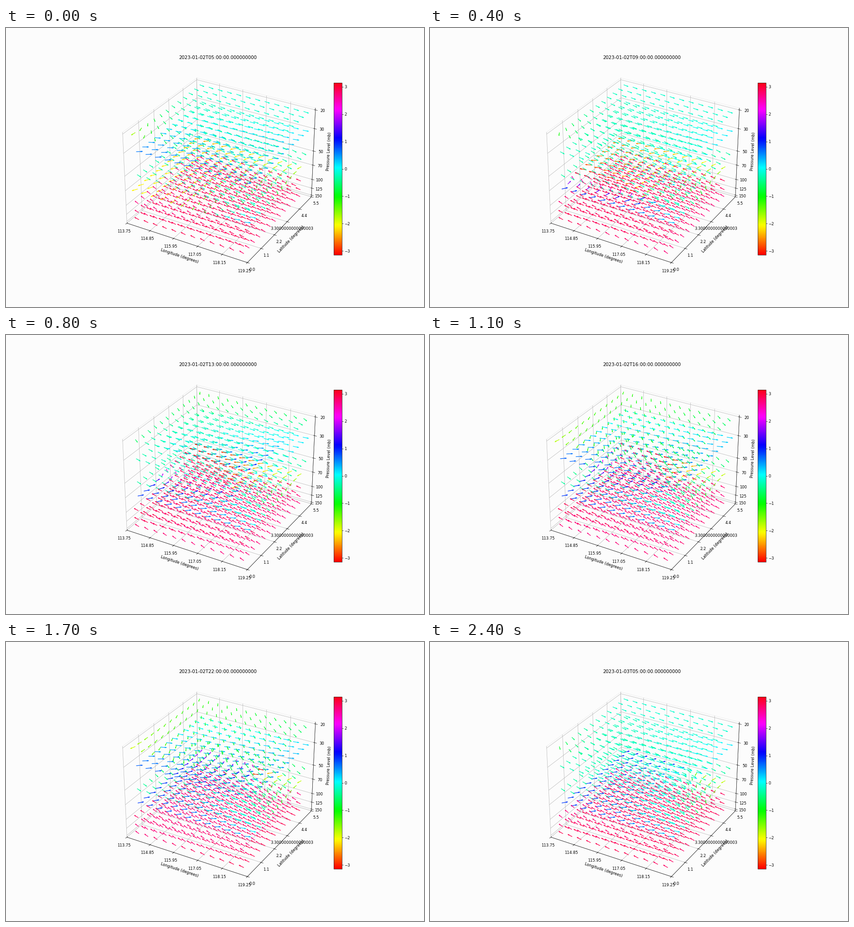
A matplotlib script that plays this animation: 917x611 px, repeating every 2.5 s.

```python
import numpy as np
import matplotlib.pyplot as plt
from matplotlib.animation import FuncAnimation
from matplotlib.cm import ScalarMappable
from matplotlib.colors import Normalize

W, H, DPI = 917, 611, 917 / 15
HOURS = 25
N = 12
SPAN = 5.5
DEPTH = 5

LEVELS = np.array([20, 30, 50, 70, 100, 125, 150])
rise = LEVELS ** -.07
HEIGHT = DEPTH * (rise - rise[0]) / (rise[0] - rise[-1])

# a runs west to east, b south to north, both 0..1
unit = np.linspace(0, 1, N)
a, b = np.meshgrid(unit, unit)


def step(h, start, end):
    s = np.clip((h - start) / (end - start), 0, 1)
    return s * s * (3 - 2 * s)


def pulse(h, centre, width):
    return np.exp(-((h - centre) / width) ** 2)


def top_wind(h):
    """20 mb: a daytime dip, a southern surge and a southwest eddy."""
    dip = step(h, 5, 9) - step(h, 20, 24)
    surge = pulse(h, 8, 2) * (1 - b) * (1.1 + .6 * a)
    eddy = (.7 + .8 * np.exp(-h / 3)) * np.exp(-4 * a - 3 * b)
    return -.15 - dip * (1 - .5 * a) + surge - eddy


def upper_wind(h):
    """30 mb: turns north in the south during the second half."""
    late = step(h, 8, 11) - step(h, 20, 24)
    turn = (late + pulse(h, 0, 2)) * (1 - b) * (.9 - .3 * a)
    return -.3 + .4 * a + turn + .1 * late


def middle_wind(h):
    """50 mb: nearly steady, dips in the northwest."""
    late = step(h, 8, 11) - step(h, 21, 24)
    return -.35 + .2 * a * (1 - b) - .65 * late * b * (1 - .6 * a)


def shear_wind(h):
    """70 mb: the west edge turns clockwise, southern rows first."""
    turned = 1 - np.exp(-(h / (2 + 15 * b)) ** 2)
    west = -2.1 - .3 * b ** 2 - 3.3 * turned
    east = .3 - 2.1 * b
    mix = a ** 1.5
    return np.angle((1 - mix) * np.exp(1j * west) + mix * np.exp(1j * east))


def low_wind(h, level):
    """Steady easterly flow below."""
    return 2.82 + .1 * np.sin(h / 4 + level / 20 + 2 * a)


def wind(h):
    upper = [top_wind(h), upper_wind(h), middle_wind(h), shear_wind(h)]
    return np.array(upper + [low_wind(h, p) for p in LEVELS[4:]])


fig = plt.figure(figsize=((W + 1e-6) / DPI, (H + 1e-6) / DPI), dpi=DPI,
                 facecolor="#fcfcfc")
ax = fig.add_axes([.125, .1106, .7642, .77], projection="3d",
                  facecolor="none")

pad = SPAN * (1.1 * 25 / 24 - 1) / 2
lim = (-pad, SPAN + pad)
ax.set_xlim(*lim)
ax.set_ylim(*lim)
ax.set_zlim(-DEPTH * 49 / 48, DEPTH / 48)

ticks = np.linspace(*lim, 6)
ax.set_xticks(ticks, [f"{113.75 + k * 1.1:.2f}" for k in range(6)])
ax.set_yticks(ticks, [str(k * 1.1) for k in range(6)])
ax.set_zticks(HEIGHT, [str(p) for p in LEVELS])
ax.set_xlabel("Longitude (degrees)")
ax.set_ylabel("Latitude (degrees)")
ax.set_zlabel("Pressure Level (mb)")
for axis in (ax.xaxis, ax.yaxis, ax.zaxis):
    axis.set_pane_color((.988, .988, .988, 1))
    axis.pane.set_edgecolor("#eeeeee")

scale = ScalarMappable(Normalize(-np.pi, np.pi), "hsv")
cax = fig.add_axes([.78375, .187, 17.9 / W, .616])
fig.colorbar(scale, cax=cax)

shape = (len(LEVELS), N, N)
X = np.broadcast_to(a * SPAN, shape).ravel()
Y = np.broadcast_to(b * SPAN, shape).ravel()
Z = np.broadcast_to(HEIGHT[:, None, None], shape).ravel()


def draw(hour):
    for old in list(ax.collections):
        old.remove()
    angle = wind(hour).ravel()
    # shaft and two head strokes share one colour
    colors = np.tile(scale.to_rgba(angle), (3, 1))
    arrows = ax.quiver(X, Y, Z, np.cos(angle), np.sin(angle), 0 * angle,
                       length=.28, colors=colors)
    day, h = divmod(hour + 5, 24)
    title = ax.set_title(f"2023-01-{2 + day:02d}T{h:02d}:00:00.000000000")
    return arrows, title


anim = FuncAnimation(fig, draw, frames=HOURS, interval=100, repeat=True)
plt.show()
```
